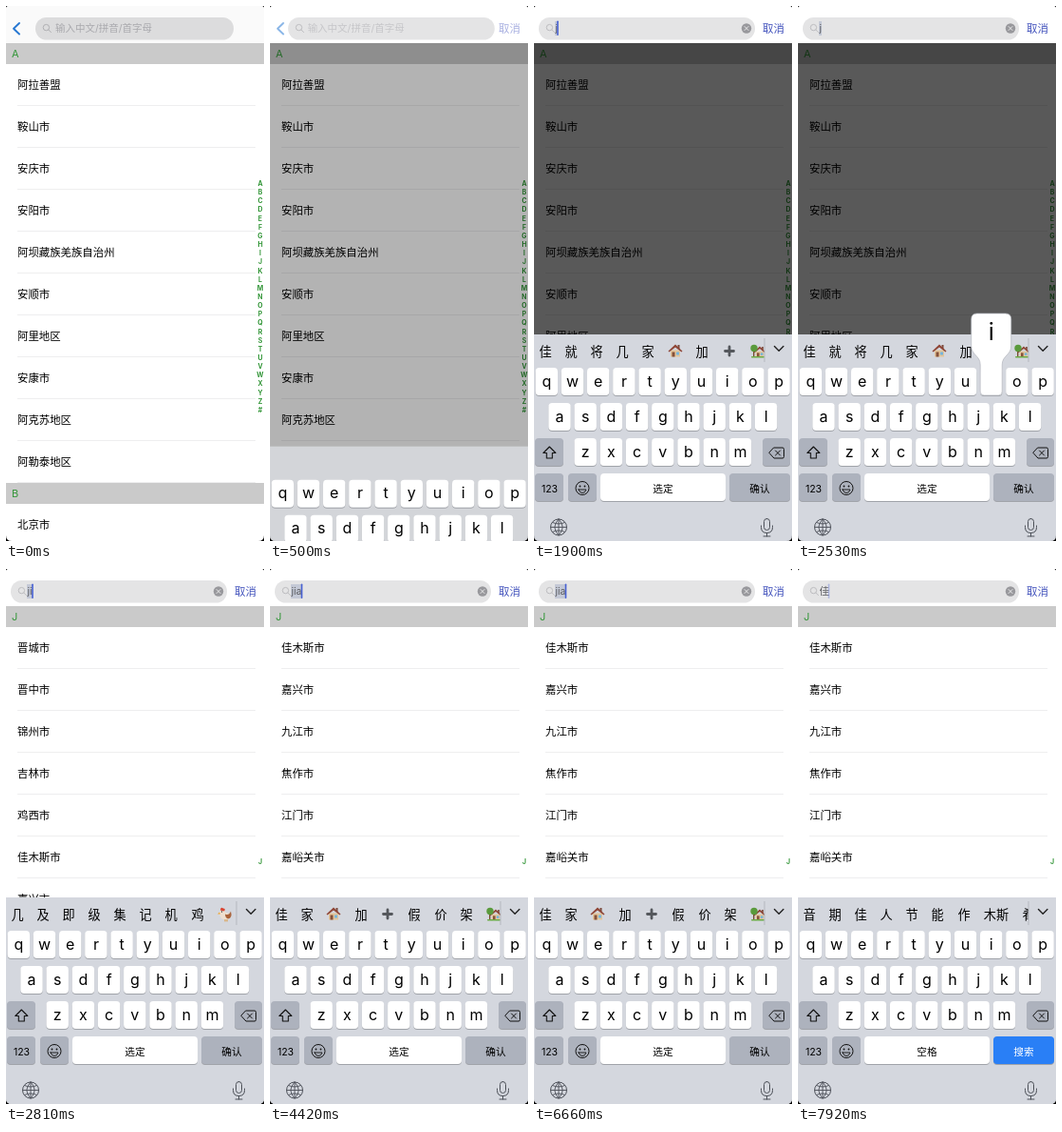
Write an HTML page that moves like this. It is 272 px wide and 562 px high and loops after 7990 ms.

```html
<!DOCTYPE html>
<html lang="zh-CN">
<head>
<meta charset="utf-8">
<style>
html, body { margin: 0; width: 100%; height: 100%; overflow: hidden; background: #000; }
svg { display: block; width: 272px; height: 562px; font-family: Inter, "Noto Sans CJK SC", "Noto Sans CJK", sans-serif; }
</style>
</head>
<body>
<svg id="stage" viewBox="0 0 272 562"></svg>
<script>
const LOOP = 7990, OPEN = 500, SLIDE = 70, BAR = 39;
const GREEN = '#35973a', GRAY_KEY = '#adb2bd';
const HINT = '输入中文/拼音/首字母';
const ALPHABET = 'ABCDEFGHIJKLMNOPQRSTUVWXYZ#';

// Search text, its start time, caret x and suggestions as "text@centre"
const STEPS = [
  { at: 0, text: '', caret: 23, picks: '' },
  { at: 1900, text: 'j', caret: 25, picks: '佳@12 就@39 将@66 几@93 家@120 house@149 加@177 plus@206 garden@236' },
  { at: 2810, text: 'ji', caret: 28, picks: '几@12 及@39 即@66 级@93 集@120 记@147 机@174 鸡@202 hen@231' },
  { at: 4420, text: 'jia', caret: 33.5, picks: '佳@12 家@39 house@67 加@96 plus@124 假@152 价@180 架@207 garden@236' },
  { at: 7010, text: '佳', caret: 32.5, picks: '音@12 期@39 佳@66 人@93 节@120 能@147 作@175 木斯@209 肴@243' }
];
const PRESSES = [['j', 1550, 1900], ['i', 2390, 2810], ['a', 4070, 4420]];
const BLINKS = [[850, 1550], [2390, 2900], [3300, 3650], [4840, 5260], [5890, 6310], [7570, 7920]];
const CITIES = {
  A: '阿拉善盟 鞍山市 安庆市 安阳市 阿坝藏族羌族自治州 安顺市 阿里地区 安康市 阿克苏地区 阿勒泰地区',
  ji: '晋城市 晋中市 锦州市 吉林市 鸡西市 佳木斯市 嘉兴市',
  jia: '佳木斯市 嘉兴市 九江市 焦作市 江门市 嘉峪关市'
};

const clamp = v => Math.max(0, Math.min(1, v));
const mix = (a, b, p) => a + (b - a) * p;
const rect = (x, y, w, h, fill, r = 0, more = '') =>
  `<rect x="${x}" y="${y}" width="${w}" height="${h}" rx="${r}" fill="${fill}" ${more}/>`;
const text = (x, y, s, size, fill = '#000', more = '') =>
  `<text x="${x}" y="${y}" font-size="${size}" fill="${fill}" ${more}>${s}</text>`;
const mid = (x, y, s, size, fill, more = '') => text(x, y, s, size, fill, 'text-anchor="middle" ' + more);
const line = (d, color, w = 1, more = '') =>
  `<path d="${d}" fill="none" stroke="${color}" stroke-width="${w}" stroke-linecap="round" stroke-linejoin="round" ${more}/>`;
const fill = (d, color) => `<path d="${d}" fill="${color}"/>`;
const dot = (x, y, r, color) => `<circle cx="${x}" cy="${y}" r="${r}" fill="${color}"/>`;
const ring = (x, y, r, color, w = 1) =>
  `<circle cx="${x}" cy="${y}" r="${r}" fill="none" stroke="${color}" stroke-width="${w}"/>`;
const group = (body, more) => `<g ${more}>${body}</g>`;

// Pictograms, centred on 0,0
const house = rect(-5, -1, 10, 7, '#e3c59b') + rect(2.5, -6.5, 2, 4, '#7a4a3c') +
  fill('M-7.5 0L0-7 7.5 0 6.5 1 0-4 -6.5 1z', '#8f4536') +
  rect(-3.5, 1, 3, 5, '#85513a') + rect(1, 1, 3, 3, '#76b5dc');
const ICONS = {
  house,
  garden: group(house, 'transform="translate(2 1) scale(.85)"') + rect(-5, 0, 1.4, 6, '#7a5032') +
    dot(-4, -3, 3.7, '#5a9a3c') + rect(-7, 5.5, 14, 1.5, '#6cab45', .7),
  plus: line('M-4.5 0H4.5M0-4.5V4.5', '#54575c', 2.8),
  hen: fill('M-6-2Q-4-7-1-4Q1 0 6-1Q7 5 1 6Q-6 6-6-2', '#eee0d0') +
    fill('M-5-4Q-5-8-2-6Q1-6-1-3z', '#d9432f') + fill('M-6-2L-8 0-5 0z', '#eea531') +
    fill('M0 0Q4 2 6-3Q8 4 3 5Q0 4 0 0', '#a9633a') + dot(-3.5, -2.5, .7, '#333') +
    line('M0 6V7.5M2 6V7.5', '#dd9637')
};

const KEYS = {};
[['qwertyuiop', 13.3, 380], ['asdfghjkl', 27, 417], ['zxcvbnm', 54.2, 454]].forEach(([row, x, y]) =>
  [...row].forEach((c, i) => KEYS[c] = [x + i * 27.2, y]));

const key = (x, y, w, color) => rect(x, y + 1, w, 29, '#a0a3a9', 4) + rect(x, y, w, 29, color, 4);

function rows(names, top) {
  return names.split(' ').map((name, i) => {
    const y = top + i * 44;
    return text(12, y + 26, name, 11.4) + rect(12, y + 43, 251, 1, '#eeeeef');
  }).join('');
}

const header = (y, c) => rect(0, y, 272, 22, '#cacaca') + text(6, y + 14.5, c, 11, GREEN);
const letter = (y, c) => mid(268, y, c, 7, GREEN, 'font-weight="700"');

function list(s) {
  if (s.at >= 2810) {
    return header(BAR, 'J') + rows(CITIES[s.text === 'ji' ? 'ji' : 'jia'], BAR + 22) + letter(309.5, 'J');
  }
  return header(BAR, 'A') + rows(CITIES.A, BAR + 22) + header(BAR + 462, 'B') + rows('北京市', BAR + 484) +
    [...ALPHABET].map((c, i) => letter(189 + i * 9.15, c)).join('');
}

function caretAlpha(t, s) {
  return clamp(BLINKS.filter(b => b[0] >= s.at).reduce((a, [out, back]) =>
    a - clamp((t - out + 70) / 210) + clamp((t - back + 70) / 210), 1));
}

function searchBar(t, s, p) {
  const x = mix(31, 5, p), w = mix(209, 228, p), lens = p ? '#bdbdc0' : '#b0b0b3';
  let out = rect(0, 0, 272, BAR, p ? '#fff' : '#fafafa') +
    rect(x, 12, w, 23.5, p ? '#e4e4e5' : '#dcdcdd', 11.5) +
    line('M14 18L8 23.7 14 29.5', '#2878d2', 1.9, `opacity="${1 - p}"`) +
    ring(x + 11.4, 22.6, 3.2, lens) + line(`M${x + 13.8} 25l2.6 2.6`, lens);
  if (!s.text) out += text(mix(52, 25, p), 27.3, HINT, 10.5, p ? '#c6c6c9' : '#a9a9ad');
  if (p) out += text(241, 27.5, '取消', 11.5, '#4454bd', `opacity="${p}"`);
  if (s.text) {
    if (s.text !== '佳') out += rect(22, 16, s.caret - 22, 15, '#c4c9d6');
    out += text(22.5, 27.2, s.text, 10.5, '#5c5d61') + dot(224, 23.5, 5.2, '#98989c') +
      line('M222 21.5l4 4m0-4l-4 4', '#e8e8e9', 1);
  }
  if (p === 1) out += rect(s.caret - .8, 15.5, 1.6, 15.5, '#4660d2', .8, `opacity="${caretAlpha(t, s)}"`);
  return out;
}

function suggestions(t, s) {
  if (!s.picks) return '';
  const items = s.picks.split(' ').map(item => {
    const [name, x] = item.split('@');
    return ICONS[name] ? group(ICONS[name], `transform="translate(${x} 362.5)"`) : mid(x, 367.5, name, 13.2);
  }).join('');
  const tapped = t >= 6730 && t < 7010 ? rect(1, 349, 22, 27, '#fff', 4) : '';
  return tapped + group(items, 'clip-path="url(#strip)"') + rect(242.5, 349, 1, 25, '#b4b7be') +
    line('M253.5 357.5l4.7 4.7 4.7-4.7', '#222', 1.4);
}

function popup(c) {
  const [x, y] = KEYS[c], top = y - 57;
  const d = `M${x - 15} ${top}h30q6 0 6 6v28c0 10-9.5 10-9.5 20v28q0 4-4 4h-15q-4 0-4-4v-28c0-10-9.5-10-9.5-20v-28q0-6 6-6z`;
  return `<path d="${d}" fill="#fff" stroke="#b3b6bd" stroke-width=".7"/>` + mid(x, top + 28, c, 25);
}

function keyboard(t, s) {
  const composing = s.text && s.text !== '佳';
  const ink = '#111', thin = '#4c5058';
  let out = rect(0, 345, 272, 230, s.picks ? '#d4d7de' : '#d3d5d9') + suggestions(t, s);
  for (const c in KEYS) {
    const [x, y] = KEYS[c];
    out += key(x - 11.7, y, 23.4, '#fff') + mid(x, y + 19.5, c, 16);
  }
  for (const [x, y, w] of [[1, 454, 30], [241, 454, 29], [1, 491, 30], [36, 491, 30]])
    out += key(x, y, w, GRAY_KEY);
  out += key(70, 491, 132, '#fff') + key(206, 491, 64, composing ? GRAY_KEY : '#297ff6') +
    line('M16.3 463l6.5 6.5h-3.5v5.5h-6v-5.5h-3.5z', ink, 1.1) +
    line('M253 464h9q1.5 0 1.5 1.5v8q0 1.5-1.5 1.5h-9l-5-5.5zM254.5 467l5 5m0-5l-5 5', ink, 1) +
    mid(16.5, 510.5, '123', 10.5) + ring(51, 506.5, 7, ink) +
    dot(48.5, 504.5, .9, ink) + dot(53.5, 504.5, .9, ink) +
    line('M47 508h8q-1 3.5-4 3.5t-4-3.5z', ink, .9) +
    mid(136, 510.7, composing ? '选定' : '空格', 10.7) +
    mid(238, 510.7, composing ? '确认' : '搜索', 10.7, composing ? '#000' : '#fff') +
    ring(26, 547.5, 8.5, thin) +
    line('M17.5 547.5h17M26 539v17M26 539q-8.5 8.5 0 17q8.5-8.5 0-17M19.5 542.5q6.5 3 13 0M19.5 552.5q6.5-3 13 0', thin, .9) +
    line('M245.5 538.5q3 0 3 3v6q0 3-3 3t-3-3v-6q0-3 3-3M239.5 546v1.5q0 6 6 6t6-6v-1.5M245.5 553.5v3.5M242 557h7', thin, 1);
  const press = PRESSES.find(k => t >= k[1] && t < k[2]);
  return out + (press ? popup(press[0]) : '');
}

function scene(t) {
  const s = STEPS.filter(k => t >= k.at).pop();
  const p = t < OPEN ? 0 : clamp(.45 + .55 * (t - OPEN) / SLIDE);
  let out = rect(0, 0, 272, 562, '#fff') + list(s);
  if (t < 2810) out += rect(0, BAR, 272, 562 - BAR, '#000', 0, `opacity="${.65 * p}"`);
  out += searchBar(t, s, p);
  if (p) out += group(keyboard(t, s), `transform="translate(0 ${217 * (1 - p)})"`);
  return '<clipPath id="screen"><path d="M3 0H269Q272 0 272 3V556Q272 562 266 562H6Q0 562 0 556V3Q0 0 3 0"/></clipPath>' +
    '<clipPath id="strip"><path d="M0 345H243V380H0z"/></clipPath>' +
    group(out, 'clip-path="url(#screen)"');
}

const stage = document.getElementById('stage');
const start = performance.now();
let shown = '';
function draw() {
  const next = scene((performance.now() - start) % LOOP);
  if (next !== shown) stage.innerHTML = shown = next;
  requestAnimationFrame(draw);
}
draw();
</script>
</body>
</html>
```
